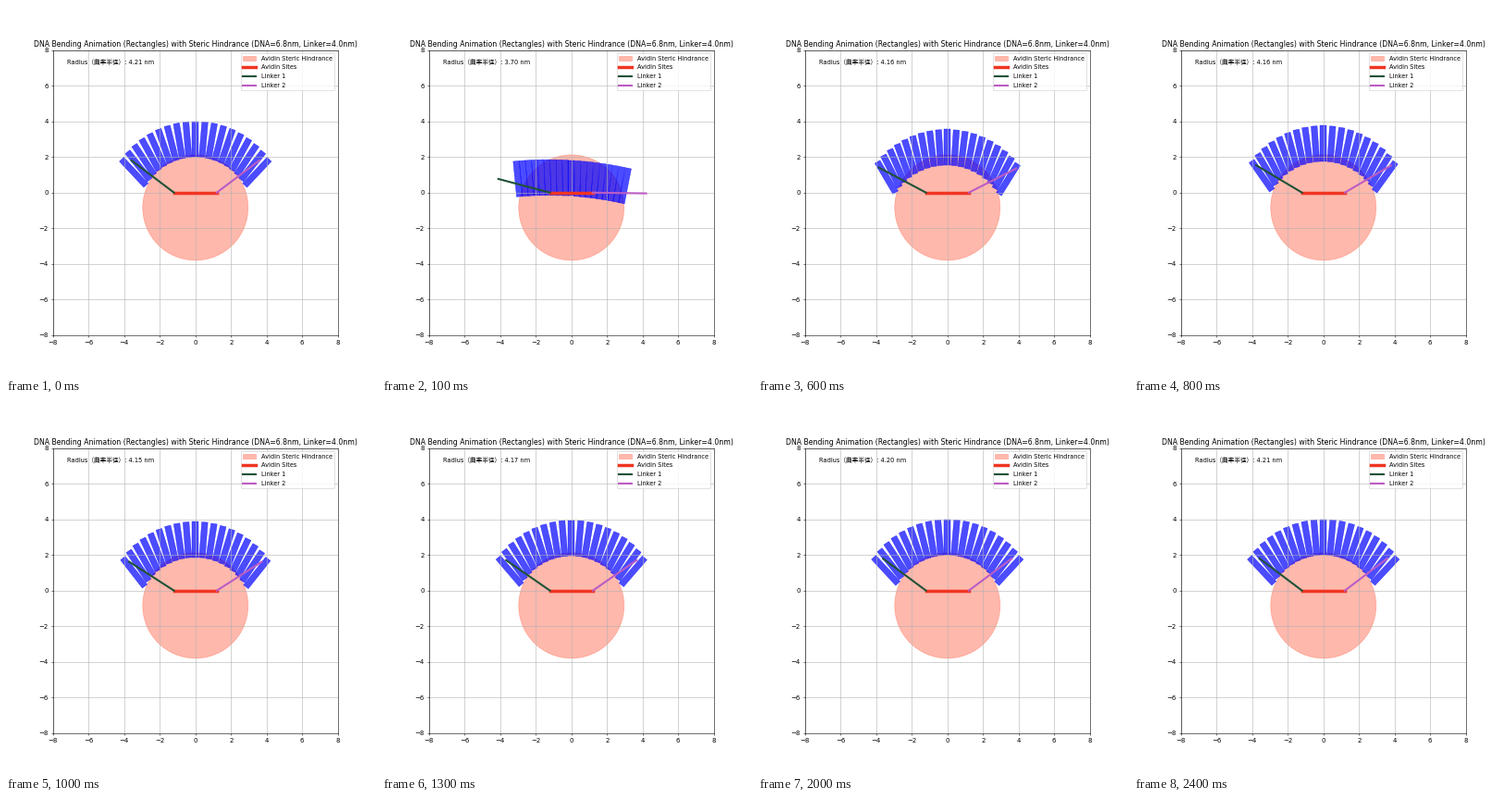
A matplotlib script that plays this animation: 400x400 px, repeating every 2500 ms.

```python
import numpy as np
import matplotlib.pyplot as plt
from matplotlib.animation import FuncAnimation
from matplotlib.collections import PolyCollection
from matplotlib.patches import Circle

plt.rcParams["font.family"] = ["DejaVu Sans", "Noto Sans CJK JP"]

SIZE, DPI = 400, 50
FRAMES, INTERVAL = 25, 100
COUNT, WIDTH, HEIGHT = 19, 0.34, 2.0
SITE, LINKER = 1.2, 3.0


def rectangles(t):
    """Corners of the DNA rectangles, spaced evenly along a rising arc."""
    top = 3 * (1 - 0.73 ** t)
    tilt = np.radians(43.5 * (1 - 0.81 ** t))
    drop = 1.86 * (1 - np.exp(-(t / 3.35) ** 1.68))
    half = 3.46 - 0.8 * np.exp(-((t - 2.5) / 2) ** 2)
    skew = 0.25 * 0.77 ** t

    u = np.linspace(-1, 1, COUNT)
    r = (half ** 2 + drop ** 2) / (2 * drop)
    phi = 2 * np.arctan(drop / half) * u
    center = np.c_[r * np.sin(phi), top - r * (1 - np.cos(phi)) - skew * u]
    a = tilt * u + 0.25 * skew * np.abs(u)
    up = np.c_[np.sin(a), np.cos(a)] * HEIGHT / 2
    side = np.c_[np.cos(a), -np.sin(a)] * WIDTH / 2
    corners = [center - side - up, center + side - up,
               center + side + up, center - side + up]
    return np.stack(corners, axis=1)


def set_linker(line, sign, degrees):
    a = np.radians(degrees)
    line.set_data([sign * SITE, sign * (SITE + LINKER * np.cos(a))],
                  [0, LINKER * np.sin(a)])


def radius(t):
    return np.interp(t, [1, 3, 6, 10, 17, 24],
                     [3.70, 3.94, 4.16, 4.15, 4.20, 4.21])


fig = plt.figure(figsize=(SIZE / DPI, SIZE / DPI), dpi=DPI)
ax = fig.add_axes([50.75 / SIZE, 44.25 / SIZE, 308 / SIZE, 308 / SIZE])
ax.set_xlim(-8, 8)
ax.set_ylim(-8, 8)
ax.grid(True)
ax.set_title("DNA Bending Animation (Rectangles) with Steric Hindrance "
             "(DNA=6.8nm, Linker=4.0nm)", fontsize=11.1)

ax.add_patch(Circle((0, -0.84), 2.96, color="tomato", alpha=0.45,
                    label="Avidin Steric Hindrance"))
dna = PolyCollection([], facecolor="blue", edgecolor="blue", alpha=0.7,
                     linewidth=0.7, zorder=1)
ax.add_collection(dna)
ax.plot([-SITE, SITE], [0, 0], color="#f03522", lw=5, label="Avidin Sites")
linker1, = ax.plot([], [], color="#1f5235", lw=3, label="Linker 1")
linker2, = ax.plot([], [], color="#ba5cc4", lw=3, label="Linker 2")
label = ax.text(0.05, 0.95, "", transform=ax.transAxes, fontsize=9.6)
ax.legend(loc="upper right", fontsize=9.4, labelspacing=0.57,
          handlelength=2.15, handletextpad=0.85)


def update(frame):
    # The loop opens on the settled shape, then relaxes towards it again.
    t = frame or FRAMES - 1
    dna.set_verts(rectangles(t))
    angle = 37.5 - 27 * 0.84 ** t
    set_linker(linker1, -1, angle)
    set_linker(linker2, 1, angle - 27 * 0.58 ** t)
    label.set_text(f"Radius（曲率半径）: {radius(t):.2f} nm")
    return dna, linker1, linker2, label


anim = FuncAnimation(fig, update, frames=FRAMES, interval=INTERVAL,
                     repeat=True, repeat_delay=0)
plt.show()
```
